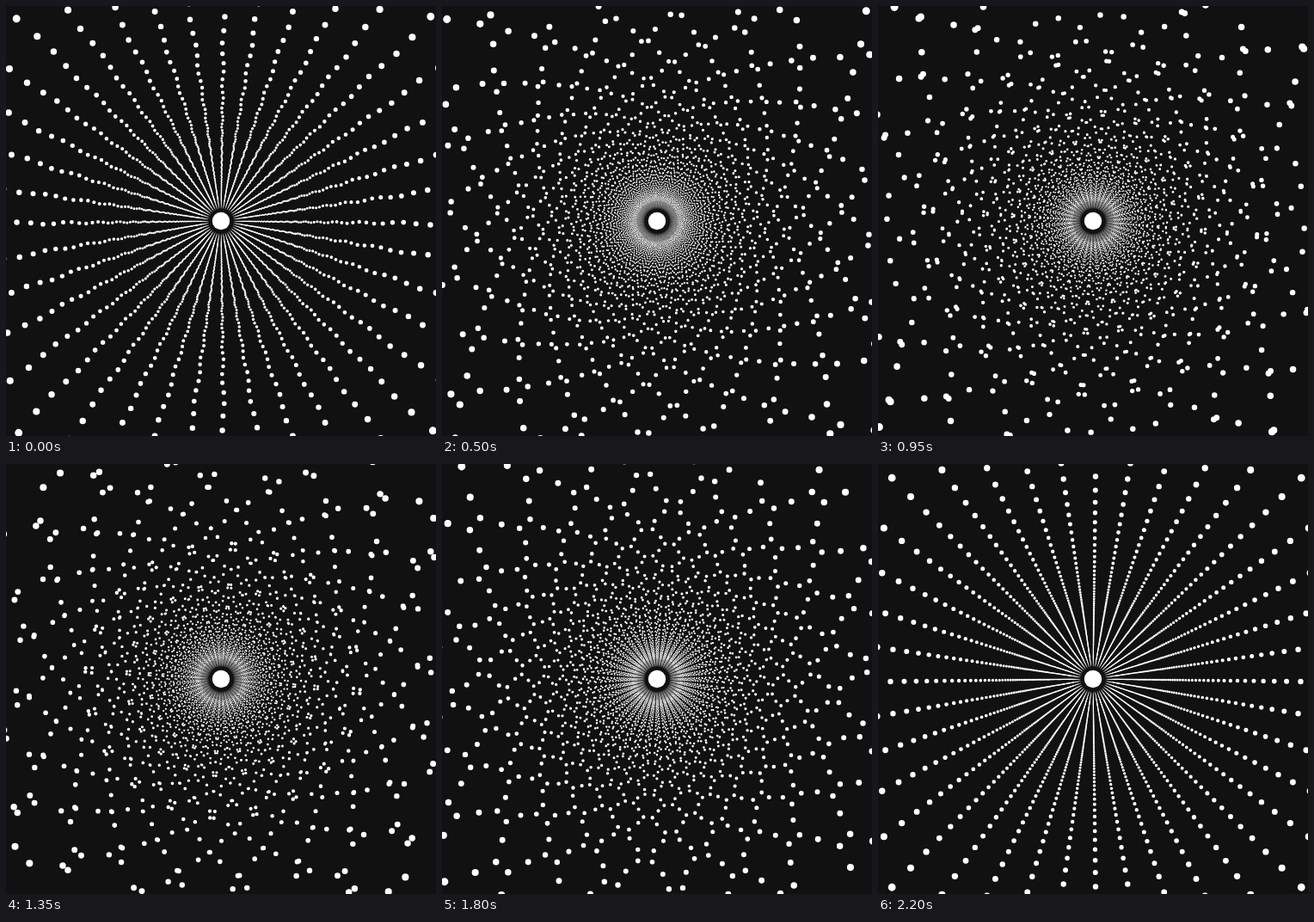
These frames come from a looping animation (500 by 500 pixels, 2.25 s). An HTML page with a canvas:

```html
<!DOCTYPE html>
<html lang="en">
<head>
<meta charset="utf-8">
<title>Dot tunnel</title>
<style>
  html, body { margin: 0; width: 100%; height: 100%; overflow: hidden; background: #111; }
  canvas { display: block; width: 500px; height: 500px; }
</style>
</head>
<body>
<canvas id="stage" width="500" height="500"></canvas>
<script>
const ctx = document.getElementById('stage').getContext('2d');
const TAU = Math.PI * 2;
const RAD = Math.PI / 180;
const CENTER = 250;
const STEP_MS = 50;
const STEPS = 45;
const SPOKES = 40;
const RINGS_PER_LOOP = 5;
const RING_SCALE = 3272;   // ring radius at depth 1
const DOT_SCALE = 41;      // dot radius at depth 1
const SWING = 5;           // largest swing in degrees
const INNER_RADIUS = 14;

function disc(x, y, r) {
  ctx.moveTo(x + r, y);
  ctx.arc(x, y, r, 0, TAU);
}

// Neighbouring spokes of a ring swing in opposite directions.
function drawRing(ring, t) {
  const depth = ring + 0.72 - RINGS_PER_LOOP * t;
  if (depth < 8.5) return;
  const phase = 80 * ring + 35 - 180 * t;
  const swing = SWING * RAD * Math.sin(Math.PI * t) * Math.cos(phase * RAD);
  const radius = RING_SCALE / depth / Math.cos(2 * swing);   // swung dots drift outwards
  const dot = DOT_SCALE / depth;
  const origin = CENTER + dot;   // dots hang from their top left corner

  ctx.globalAlpha = Math.max(0, Math.min(1, (radius - INNER_RADIUS) / 14));
  ctx.beginPath();
  for (let j = 0; j < SPOKES; j++) {
    const angle = j * TAU / SPOKES + (j % 2 ? -swing : swing);
    disc(origin + radius * Math.sin(angle), origin - radius * Math.cos(angle), dot + 0.2);
  }
  ctx.fill();
}

function draw(step) {
  const t = ((step + 1) % STEPS) / STEPS;
  ctx.globalAlpha = 1;
  ctx.fillStyle = '#111';
  ctx.fillRect(0, 0, 500, 500);
  ctx.fillStyle = '#fff';
  const last = RING_SCALE / INNER_RADIUS + RINGS_PER_LOOP;
  for (let ring = 8; ring < last; ring++) drawRing(ring, t);
  ctx.globalAlpha = 1;
  ctx.beginPath();
  disc(CENTER, CENTER, 10.2);
  ctx.fill();
}

const start = performance.now();
let shown = 0;
draw(0);

function tick() {
  const step = Math.floor((performance.now() - start) / STEP_MS) % STEPS;
  if (step !== shown) draw(shown = step);
  requestAnimationFrame(tick);
}
requestAnimationFrame(tick);
</script>
</body>
</html>
```
